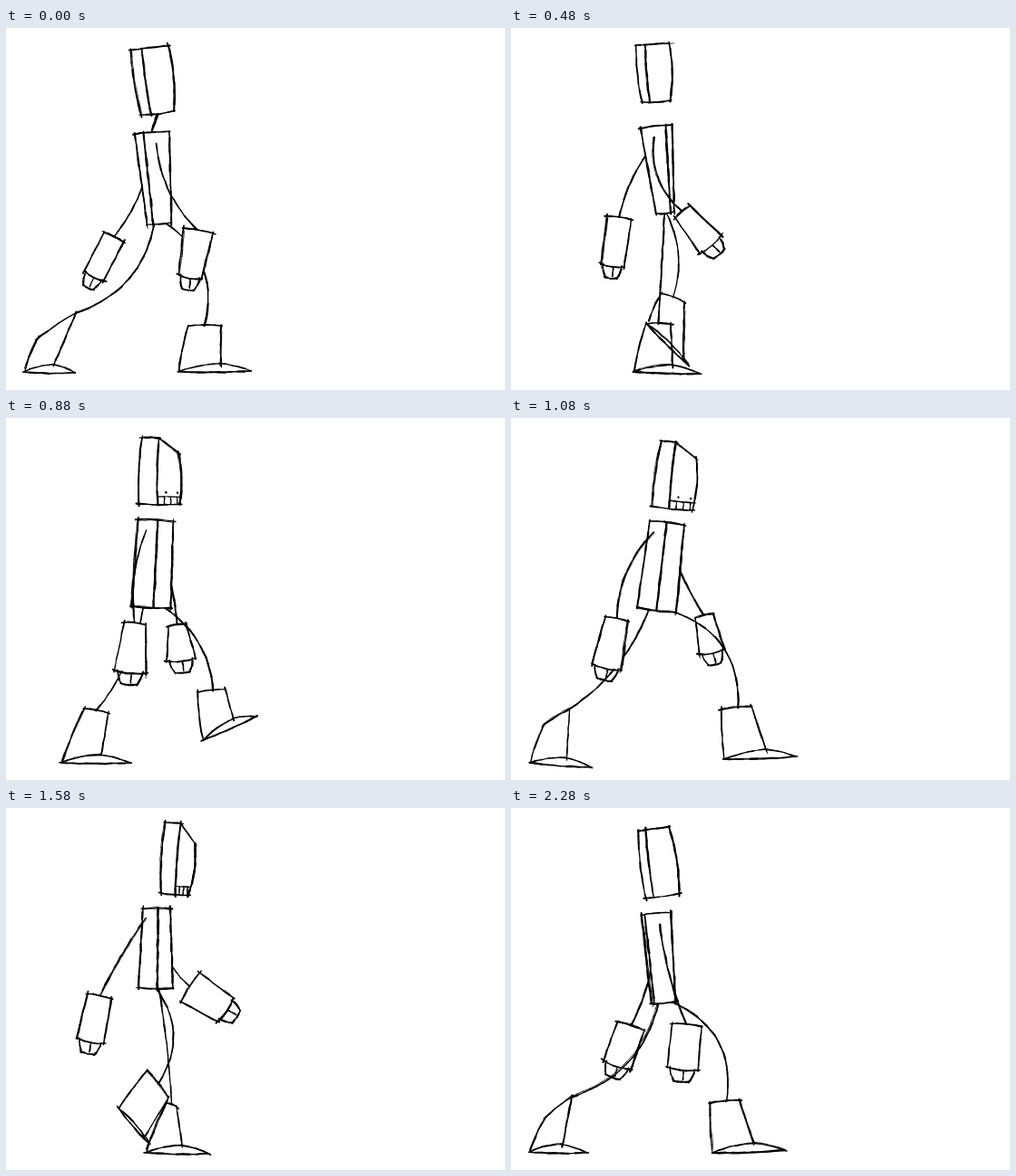
An HTML page with a canvas that plays this animation: 550 px wide and 400 px high, repeating every 2.38 s.

```html
<!DOCTYPE html>
<html lang="en">
<head>
<meta charset="utf-8">
<title>Walk cycle</title>
<style>
html, body { margin: 0; width: 100%; height: 100%; overflow: hidden; background: #fff; }
canvas { display: block; width: 550px; height: 400px; }
</style>
</head>
<body>
<canvas id="stage" width="550" height="400"></canvas>
<script>
const ctx = document.getElementById('stage').getContext('2d');
const LOOP = 2380, STEPS = 24;

// Key poses of the rig, by step.
// Boxes: spine top x,y, spine end x,y, top width, end width.
// Head adds: ridge position, turn towards the viewer.
const head = {
  0: [158, 22, 167, 94, 42, 36, .3, 0],
  5: [156, 18, 160, 81, 36, 31, .28, 0],
  9: [170, 22, 169, 95, 40, 45, .46, 1],
  13: [198, 30, 186, 102, 35, 40, .36, .9],
  16: [192, 17, 186, 95, 33, 30, .52, 1.3],
  20: [167, 27, 169, 93, 31, 28, .18, 0],
  23: [157, 23, 167, 97, 34, 37, .24, 0]
};
// Torso adds: ridge position, near shoulder position.
const torso = {
  0: [161, 116, 169, 216, 38, 27, .25, .6],
  5: [160, 109, 170, 204, 35, 20, .8, .4],
  9: [165, 113, 160, 209, 39, 43, .56, .25],
  13: [177, 118, 163, 212, 36, 41, .46, .08],
  16: [166, 111, 165, 199, 30, 38, .55, .12],
  20: [166, 116, 166, 206, 40, 38, .62, .4],
  23: [160, 117, 168, 215, 33, 27, .12, .6]
};
// Forearms add: bend of the upper arm.
const nearArm = {
  0: [212, 224, 203, 275, 33, 26, 10],
  5: [189, 203, 220, 239, 21, 31, 12],
  9: [142, 227, 137, 280, 24, 35, 7],
  13: [97, 213, 85, 264, 27, 30, 13],
  16: [103, 208, 93, 257, 27, 30, 2],
  20: [145, 214, 129, 275, 31, 36, 2],
  23: [194, 240, 189, 288, 33, 34, 4]
};
const farArm = {
  0: [119, 231, 97, 274, 24, 24, -7],
  5: [119, 210, 112, 262, 27, 26, 6],
  9: [189, 229, 193, 267, 20, 32, -4],
  13: [226, 205, 241, 245, 24, 25, 10],
  16: [203, 198, 242, 223, 38, 31, 8],
  20: [175, 231, 199, 266, 21, 23, 8],
  23: [132, 241, 117, 284, 31, 32, -6]
};
// Legs: knee back x,y, knee front x,y, heel x,y, toe x,y, thigh bend.
const nearLeg = {
  0: [201, 329, 237, 329, 190, 380, 270, 379, -21],
  5: [149, 327, 176, 327, 135, 380, 208, 382, 0],
  9: [86, 321, 113, 326, 61, 381, 137, 381, -8],
  12: [26, 342, 55, 319, 8, 380, 70, 382, -15],
  13: [104, 295, 127, 316, 33, 374, 97, 345, -22],
  16: [156, 290, 179, 320, 124, 332, 157, 370, -18],
  20: [204, 290, 236, 291, 198, 343, 273, 338, -15],
  23: [219, 326, 252, 323, 222, 381, 301, 378, -24]
};
const farLeg = {
  0: [35, 343, 77, 315, 20, 380, 76, 381, -19],
  5: [166, 293, 191, 303, 150, 327, 196, 373, -10],
  9: [211, 303, 242, 300, 217, 356, 275, 330, -13],
  11: [232, 322, 265, 319, 235, 377, 314, 374, -24],
  13: [202, 330, 236, 331, 198, 380, 265, 379, -22],
  16: [177, 326, 188, 330, 154, 381, 223, 382, -2],
  20: [82, 327, 106, 334, 47, 384, 133, 386, -12],
  23: [38, 342, 67, 319, 20, 380, 83, 381, -20]
};

// Cyclic Hermite blend between neighbouring keys
function poseAt(keys, step) {
  const steps = Object.keys(keys).map(Number), n = steps.length;
  const time = i => steps[(i + n) % n] + Math.floor(i / n) * STEPS;
  const i = steps.filter(s => s <= step).length - 1;
  const [t0, t1, t2, t3] = [-1, 0, 1, 2].map(k => time(i + k));
  const [a, b, c, d] = [-1, 0, 1, 2].map(k => keys[steps[(i + k + n) % n]]);
  const span = t2 - t1, u = (step - t1) / span;
  const h = u * u * (3 - 2 * u), g1 = u * (1 - u) * (1 - u), g2 = u * u * (u - 1);
  return b.map((v, j) => v + (c[j] - v) * h +
    span * (g1 * (c[j] - a[j]) / (t2 - t0) + g2 * (d[j] - v) / (t3 - t1)));
}

let seed = 1;
function rnd() {
  seed = (seed * 16807) % 2147483647;
  return seed / 2147483647;
}
const wobble = r => (rnd() * 2 - 1) * r;
const clamp = (v, lo, hi) => Math.max(lo, Math.min(hi, v));
const mix = (a, b, t) => [a[0] + (b[0] - a[0]) * t, a[1] + (b[1] - a[1]) * t];
const dist = (a, b) => Math.hypot(b[0] - a[0], b[1] - a[1]) || 1;
const along = (a, b, px) => mix(a, b, px / dist(a, b));

// Point beside a, to the left when looking from a to b as a downward line
function beside(a, dir, px) {
  const len = Math.hypot(...dir) || 1;
  return [a[0] - dir[1] / len * px, a[1] + dir[0] / len * px];
}

// Uneven pen line from a to b, bowed sideways by bend
function pen(a, b, bend, w, over) {
  const len = dist(a, b), n = Math.max(4, Math.round(len / 7));
  const dir = [b[0] - a[0], b[1] - a[1]];
  const from = -rnd() * over / len, to = 1 + rnd() * over / len;
  let last;
  for (let k = 0; k <= n; k++) {
    const t = from + (to - from) * k / n;
    const p = beside(mix(a, b, t), dir, 4 * bend * t * (1 - t) + wobble(.35));
    if (last) {
      ctx.lineWidth = w * (.7 + rnd() * .6);
      ctx.beginPath();
      ctx.moveTo(...last);
      ctx.lineTo(...p);
      ctx.stroke();
    }
    last = p;
  }
}

// Main line, often with a thin loose one beside it
function sketch(a, b, bend = 0, w = 1.7, over = 3) {
  pen(a, b, bend, w, over);
  if (dist(a, b) < 18 || rnd() > .6) return;
  const dx = wobble(1.2), dy = wobble(1.2), t = rnd() * .3;
  const shift = p => [p[0] + dx, p[1] + dy];
  if (bend) pen(shift(a), shift(b), bend, .8, 0);
  else pen(shift(mix(a, b, t)), shift(b), 0, .9, over + 3);
}

// Corners: top left, top right, bottom right, bottom left
function box([x0, y0, x1, y1, w0, w1]) {
  const a = [x0, y0], b = [x1, y1], dir = [x1 - x0, y1 - y0];
  return [beside(a, dir, w0 / 2), beside(a, dir, -w0 / 2),
    beside(b, dir, -w1 / 2), beside(b, dir, w1 / 2)];
}
const inside = ([a, b, c, d], u, v) => mix(mix(a, b, u), mix(d, c, u), v);

function fill(points) {
  ctx.beginPath();
  points.forEach(p => ctx.lineTo(...p));
  ctx.fill();
}

function drawHead(pose) {
  const q = box(pose), [, , , , , , ridge, turn] = pose;
  const peak = inside(q, ridge, 0), base = inside(q, ridge, 1);
  const brow = [q[1][0], q[1][1] + 16 * turn];
  sketch(q[0], q[3], 2);
  sketch(q[0], peak);
  sketch(peak, brow);
  sketch(brow, q[2], -3, 2.1);
  sketch(q[3], q[2], 1);
  sketch(peak, base, 1, 2);
  if (turn < .8) return;
  const at = (u, v) => inside(q, ridge + (1 - ridge) * u, v);
  sketch(at(0, .89), at(1, .89), 0, 1.3, 0);
  for (let u = .3; u < 1; u += .3) sketch(at(u, .89), at(u, 1), 0, 1.3, 0);
  if (turn > 1.15) return;
  for (const u of [.35, .9]) sketch(at(u, .82), along(at(u, .82), q[2], 1), 0, 1.6, 0);
}

function drawTorso(pose) {
  const q = box(pose), ridge = pose[6];
  fill(q);
  sketch(q[0], q[3], 0, 1.9);
  sketch(q[0], q[1], -1);
  sketch(q[1], q[2], 0, 2.1);
  sketch(q[3], q[2], 1);
  sketch(inside(q, ridge, 0), inside(q, ridge, 1), 0, 2.3);
}

function drawArm(pose, shoulder) {
  const q = box(pose), [x0, y0, x1, y1, , w1, bend] = pose;
  sketch(shoulder, [x0, y0], bend, 1.7, 0);
  const wrist = [x1, y1], tip = along(wrist, [x0, y0], -14);
  const hand = box([...wrist, ...tip, w1 * .8, w1 * .5]);
  fill(q);
  sketch(q[0], q[3]);
  sketch(q[0], q[1], -1);
  sketch(q[1], q[2], 0, 1.9);
  sketch(q[3], q[2], 2);
  sketch(hand[0], hand[3], 1, 1.9, 1);
  sketch(hand[3], hand[2], 1, 1.9, 1);
  sketch(hand[2], hand[1], 1, 1.9, 1);
  sketch(inside(hand, .55, .2), inside(hand, .6, .9), 0, 1.5, 0);
}

function drawLeg(pose, body) {
  const pairs = [0, 2, 4, 6].map(i => [pose[i], pose[i + 1]]);
  const [back, front, heel, toe] = pairs, bend = pose[8];
  const knee = mix(back, front, .5 + clamp((back[1] - front[1]) / 50, 0, .5));
  const centre = inside(body, .5, 1)[0];
  const hip = inside(body, clamp(.5 + (knee[0] - centre) / 200, .3, .9), 1);
  const steep = clamp((toe[1] - heel[1]) / dist(heel, toe), 0, 1);
  const ankle = mix(heel, toe, .58 + .4 * steep);
  const instep = [ankle[0], ankle[1] - 9 * (1 - steep)];
  sketch(hip, knee, bend, 1.7, 0);
  sketch(back, along(heel, back, 4), 1);
  sketch(back, front, -1);
  sketch(front, instep);
  sketch(heel, instep, -2, 1.5, 0);
  sketch(instep, toe, -1, 1.5);
  sketch(heel, toe, 1, 1.9);
}

function draw(step) {
  seed = 7919 + step * 104729;
  ctx.fillStyle = '#fff';
  ctx.strokeStyle = '#000';
  ctx.lineCap = ctx.lineJoin = 'round';
  ctx.fillRect(0, 0, 550, 400);
  const skull = poseAt(head, step), chest = poseAt(torso, step), body = box(chest);
  drawArm(poseAt(farArm, step), inside(body, .5, .15));
  drawLeg(poseAt(farLeg, step), body);
  drawLeg(poseAt(nearLeg, step), body);
  drawTorso(chest);
  drawHead(skull);
  // The neck is only inked on the first drawing
  if (step === 0) sketch([skull[2], skull[3] + 2], [chest[0], chest[1] - 3], 0, 2.6, 0);
  drawArm(poseAt(nearArm, step), inside(body, chest[7], .12));
}

const start = performance.now();
let shown = -1;
function tick() {
  const t = (performance.now() - start) % LOOP;
  const step = t < 80 ? 0 : 1 + Math.floor((t - 80) / 100);
  if (step !== shown) draw(shown = step);
  requestAnimationFrame(tick);
}
tick();
</script>
</body>
</html>
```
